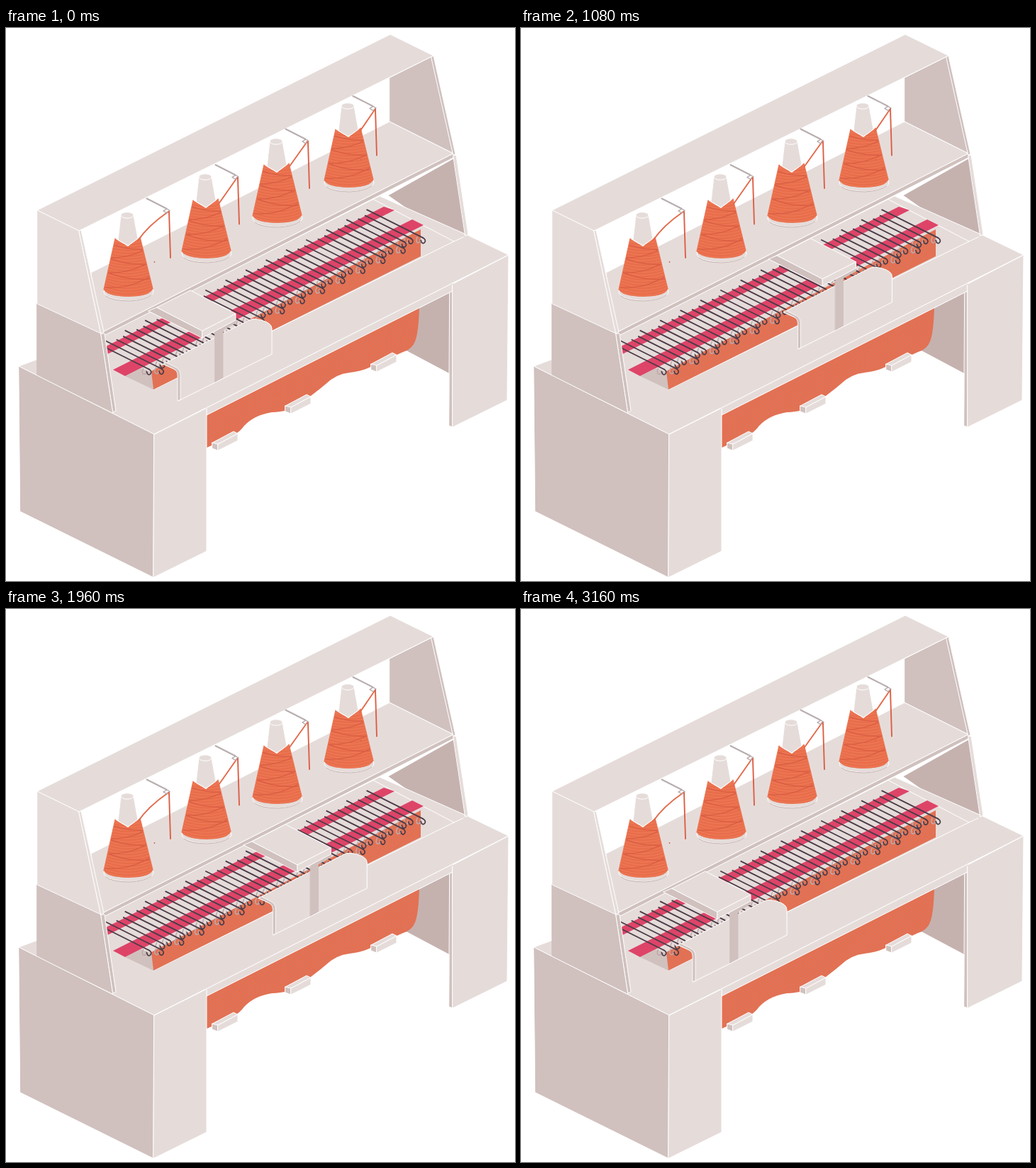
Animation of 718x780 px, one loop 3.48 s. Source, as an HTML page:

```html
<!DOCTYPE html>
<html lang="en">
<head>
<meta charset="utf-8">
<title>Knitting machine</title>
<style>
html, body { margin: 0; width: 100%; height: 100%; overflow: hidden; background: #fff; }
svg { display: block; width: 718px; height: 780px; }
</style>
</head>
<body>
<svg id="stage" viewBox="0 0 718 780" xmlns="http://www.w3.org/2000/svg"></svg>
<script>
const LIGHT = '#e5dcda', MID = '#d0c1be', DARK = '#c5b2af';
const YARN = '#ec7452', THREAD = '#dc5f45', PINK = '#de4468', STEEL = '#4b3c48';

const path = (d, fill, stroke = '#fff', width = 1) =>
  `<path d="${d}" fill="${fill}" stroke="${stroke}" stroke-width="${width}" stroke-linejoin="round" stroke-linecap="round"/>`;
const poly = (points, fill, stroke) => path(`M${points}Z`, fill, stroke);
const line = (d, color = '#fff', width = 1) => path(d, 'none', color, width);
const shift = (x, y, body) => `<g transform="translate(${x} ${y})">${body}</g>`;

const defs = `<defs>
  <pattern id="knit" width="4" height="5" patternUnits="userSpaceOnUse" patternTransform="skewY(-26.6)">
    <rect width="4" height="5" fill="#e96e4d"/>
    <path d="M.6 .6L1.6 2.2M3.2 2.8L2.4 4.4" stroke="#bd8279" stroke-width=".9"/>
  </pattern>
  <clipPath id="cone"><path d="M154 297L172 308L189 295L207 368Q204 378 173 379Q142 378 138 369Z"/></clipPath>
</defs>`;

function needles() {
  const pitch = 28.4 / 3;
  let shafts = '', hooks = '', loops = '';
  for (let k = -4; k <= 36; k++) {
    const x = 168.4 + k * pitch, y = 426.8 - k * pitch / 2;
    const long = k % 3 === 0;
    const from = long ? 0 : 7, to = long ? 79 : 71;
    shafts += `M${x + from} ${y + from / 2}L${x + to} ${y + to / 2}`;
    hooks += `M${x + to} ${y + to / 2}q4 2 3 5.5q-2 4-5 1l-1-3`;
    loops += `M${x + to - 8} ${y + to / 2 - 1}q-3 7 1 8q4 0 3-5`;
  }
  return line(loops, '#bfa9aa', 1.6) + line(shafts, STEEL, 1.9) + line(hooks, STEEL, 1.7);
}

function cone(x, y) {
  let fine = '', cross = '';
  for (let i = 0; i < 20; i++) {
    const h = 298 + i * 4.1;
    fine += `M136 ${h}Q173 ${h + 16} 210 ${h - 1}`;
  }
  for (let i = 0; i < 6; i++) {
    const h = 303 + i * 10.5;
    cross += i % 2
      ? `M136 ${h + 10}Q178 ${h + 14} 210 ${h - 10}`
      : `M136 ${h - 4}Q170 ${h + 14} 210 ${h + 8}`;
  }
  return shift(x, y,
    `<ellipse cx="173" cy="372" rx="35" ry="12.5" fill="${LIGHT}" stroke="#fff"/>` +
    line('M141 378Q150 385 174 385Q196 384 205 377', '#b9a5a3', .8) +
    `<g clip-path="url(#cone)"><rect x="136" y="290" width="74" height="92" fill="${YARN}"/>` +
    line(fine, '#e2653f', .8) + line(cross, '#d95c43', 1.3) + '</g>' +
    line('M154 297L138 369', YARN, 1.2) + line('M189 295L207 368', YARN, 1.2) +
    path('M162 264L158 299L172 307L186 297L180 264Z', LIGHT) +
    `<ellipse cx="171" cy="264" rx="9" ry="4.2" fill="${LIGHT}" stroke="#fff"/>`);
}

const guide = (x, y) => shift(x, y,
  line('M198.500 240.500L226 254.500', '#b8adae', 2) +
  line('M222 258L227 255L231 257.500L227 261Z', '#b1a3a5', 1.4) +
  line('M230 259L232 324', THREAD, 1.9) +
  `<circle cx="209.500" cy="330" r=".9" fill="${THREAD}"/>`);

const grip = (x, y) => shift(x, y,
  poly('291 585 321 569 327 572 299 587', LIGHT) +
  poly('291 585 299 587 299 596 291 593', MID) +
  poly('299 587 327 572 327 582 299 596', LIGHT));

function bed() {
  return poly('539 236 633 183 651 292 632 301', DARK) +
    poly('565 455 583 395 627 372 627 488', DARK, 'none') +
    poly('18 477 139 432 527 237 651 292 709 320 209 573', LIGHT) +
    line('M517 241L632 301L208 510M645 295L632 301') +
    poly('141 449 533 252 548 257 141 461', PINK, 'none') +
    poly('151 482 573 270 589 278 168 491', PINK, 'none') +
    poly('168 491 190 480 206 486 208 510', MID, 'none') +
    poly('205 484 585 284 585 322 208 510', 'url(#knit)', 'none') +
    needles();
}

function shelf() {
  return poly('541 70 603 39 631 177 541 132', MID) +
    poly('120 345 541 132 631 177 134 430', LIGHT) +
    poly('134 430 631 177 633 182 136 435', MID) +
    poly('631 180 635 179 652 291 648 293', LIGHT) +
    poly('600 41 603 39 634 178 631 179', MID) +
    poly('44 257 542 9 603 39 103 286', LIGHT);
}

function leftWall() {
  return poly('44 257 103 286 134 431 44 389', LIGHT) +
    poly('103 286 106 285 138 429 134 431', LIGHT) +
    poly('44 389 134 431 151 542 44 490', MID, MID) +
    line('M44 389L134 431L151 542') +
    poly('134 431 139 431 155 540 151 542', MID);
}

function base() {
  const drape = 'M283 545L583 394Q582 430 577 442Q573 453 560 457L520 475Q505 484 485 486' +
    'Q465 488 450 503Q430 520 410 533Q400 541 375 542Q350 546 336 561Q330 570 318 576L283 592Z';
  return path(drape, 'url(#knit)', 'none') +
    grip(0, 0) + grip(103, -52) + grip(224, -111) +
    poly('283 536 630 361 630 371 283 546', LIGHT) +
    poly('18 477 209 573 208 775 20 682', MID) +
    poly('209 573 283 536 283 738 208 775', LIGHT) +
    poly('626 373 630 371 630 563 625 561', MID) +
    poly('630 361 709 320 707 525 630 563', LIGHT) +
    line('M282 536L630 361', LIGHT, 2) + line('M209 573L709 320');
}

function carriage() {
  return path('M222 474L343 412Q349 409 360 412Q375 416 375 424V460L243 526V490Q243 484 237 481Z', LIGHT) +
    path('M222 474L236 480.500Q242 483 242 490V526L246 524V488Q245 481 238 478L226 472Z', MID, '#fff', .8) +
    poly('295 427 324 412 324 416 306 426 306 493 295 499', MID, MID) +
    poly('201 399 213 394 277 427 277 437', MID) +
    poly('277 427 324 403 324 412 277 437', LIGHT) +
    poly('213 394 260 370 324 403 277 427', LIGHT);
}

const strands = line(
  'M186 300Q200 279 229 259M300 248L326 211M400 195L425 160M499 146L521 114', '#e2694a', 1.9);
const cones = cone(0, 0) + cone(110, -54) + cone(210, -104) + cone(311, -154);
const guides = guide(0, 0) + guide(97, -47.5) + guide(196, -98) + guide(291, -144.5);

document.getElementById('stage').innerHTML =
  defs + bed() + shelf() + leftWall() + base() + cones + strands + guides +
  `<g id="carriage">${carriage()}</g>`;

// time (ms), horizontal travel (px), speed (px/ms)
const KEYS = [
  [0, 0, 0], [560, 0, 0], [1520, 264, 0], [2520, -52, 0],
  [2600, -45, .06], [2800, -36, .06], [3160, 0, 0], [3480, 0, 0]
];

function travel(t) {
  const i = KEYS.findIndex(key => key[0] > t);
  const [t0, p0, v0] = KEYS[i - 1], [t1, p1, v1] = KEYS[i];
  const d = t1 - t0, u = (t - t0) / d, w = 1 - u;
  return p0 * w * w * (1 + 2 * u) + p1 * u * u * (3 - 2 * u) + d * u * w * (v0 * w - v1 * u);
}

const slider = document.getElementById('carriage');
const start = performance.now();
function draw(now) {
  const t = Math.floor(Math.max(0, now - start) % 3480 / 40) * 40;
  const x = travel(t);
  slider.setAttribute('transform', `translate(${x} ${-x * .493})`);
  requestAnimationFrame(draw);
}
draw(start);
</script>
</body>
</html>
```
